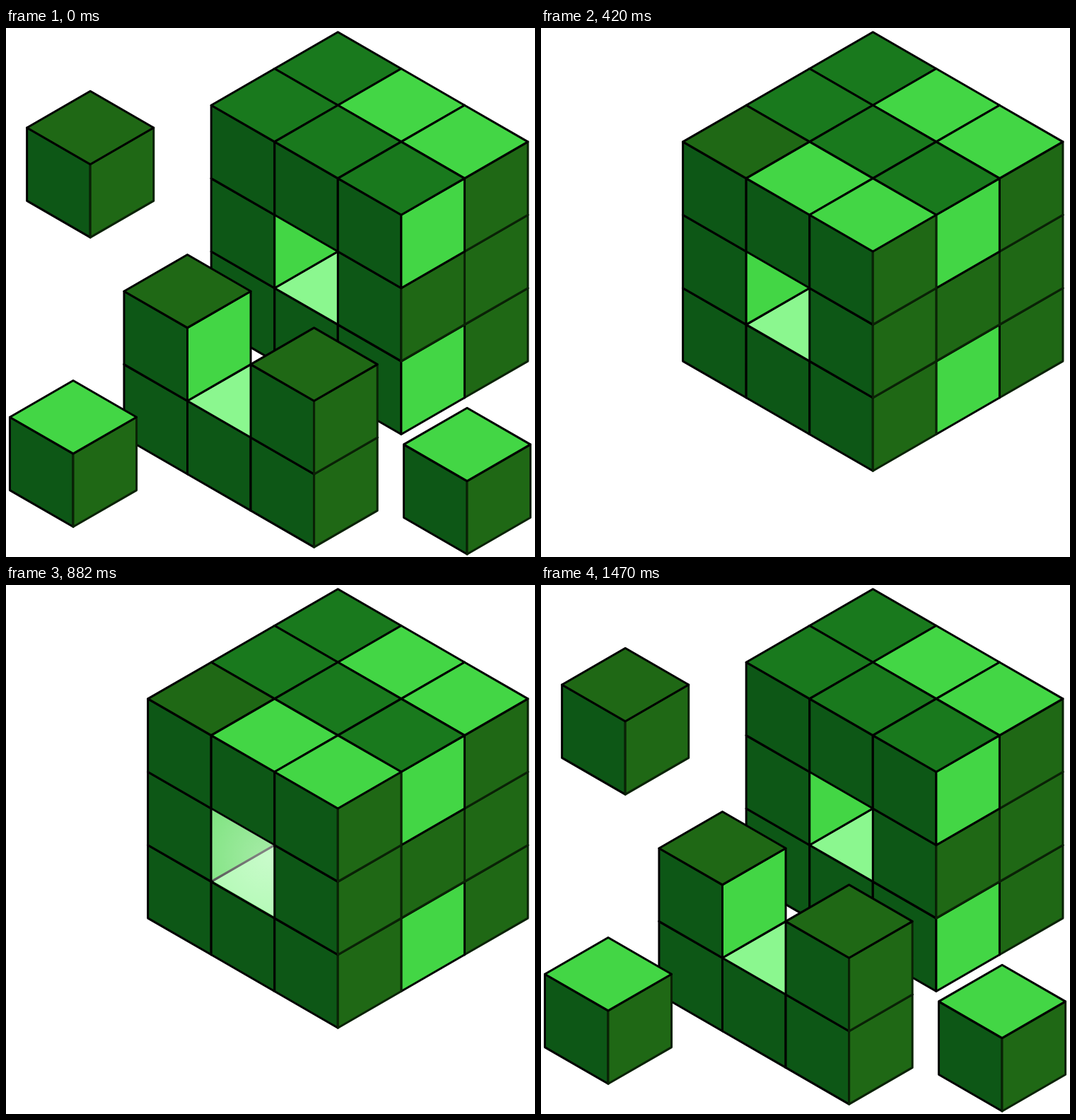
These frames come from a looping animation (748 by 748 pixels, 1.68 s). An HTML page with a canvas:

```html
<!DOCTYPE html>
<html lang="en">
<head>
<meta charset="utf-8">
<title>Cube assembly</title>
<style>
  html, body { margin: 0; width: 100%; height: 100%; overflow: hidden; background: #fff; }
  canvas { display: block; }
</style>
</head>
<body>
<canvas id="stage" width="748" height="748"></canvas>
<script>
const ctx = document.getElementById('stage').getContext('2d');
const W = 89.55, H = 51.7, Z = 2 * H;
const TOP = '#19791d', LEFT = '#0d5716', RIGHT = '#1f6815';
const BRIGHT = '#43d645', PALE = '#8bf78f', EDGE = '#0a2206';

// Isometric grid: i runs right-down, j left-down, k straight down.
const project = (i, j, k) => [469.3 + (i - j) * W, 5.8 + (i + j) * H + k * Z];

function tracePath(points) {
  ctx.beginPath();
  points.forEach(([x, y]) => ctx.lineTo(x, y));
  ctx.closePath();
}

function face(points, fill, edge = '#000') {
  tracePath(points);
  ctx.fillStyle = fill;
  ctx.strokeStyle = edge;
  ctx.fill();
  ctx.stroke();
}

// (x, y) is the rear corner of the top face.
function cube([x, y], top, right = RIGHT) {
  const l = x - W, r = x + W, mid = y + H, front = y + 2 * H;
  face([[l, mid], [x, front], [x, front + Z], [l, mid + Z]], LEFT);
  face([[x, front], [r, mid], [r, mid + Z], [x, front + Z]], right,
    right === RIGHT ? EDGE : '#000');
  face([[x, y], [r, mid], [x, front], [l, mid]], top);
}

function backBlock() {
  for (let k = 2; k >= 0; k--)
    for (let j = 0; j < 2; j++)
      for (let i = 0; i < 3; i++) {
        if (i === 1 && j === 1 && k === 1) continue;
        const top = k === 2 ? PALE : j === 0 && i > 0 ? BRIGHT : TOP;
        const lit = j === 1 && (i === 2 ? k !== 1 : i === 0 && k === 1);
        cube(project(i, j, k), top, lit ? BRIGHT : RIGHT);
      }
}

function frontBracket([x, y]) {
  const at = (i, k) => [x + i * W, y + i * H + k * Z];
  for (let i = 0; i < 3; i++) cube(at(i, 1), i === 1 ? PALE : RIGHT);
  cube(at(0, 0), RIGHT, BRIGHT);
  cube(at(2, 0), RIGHT);
}

function glow() {
  const light = ctx.createRadialGradient(372, 385, 0, 372, 385, 130);
  light.addColorStop(0, 'rgba(255,255,255,.53)');
  light.addColorStop(1, 'rgba(255,255,255,.27)');
  tracePath([[291.5, 318], [378, 368], [378, 467.5], [291.5, 417.5]]);
  ctx.fillStyle = light;
  ctx.fill();
}

// Corners of the bracket and the three loose cubes, from apart to joined.
const poses = [
  { bracket: [256.5, 320.5], loose: [[119.2, 89.3], [95, 498.5], [652, 537.2]] },
  { bracket: [276.5, 288.5], loose: [[191.2, 95.5], [234.2, 362], [583.2, 417.7]] },
  { bracket: project(0, 2, 1), loose: [0, 1, 2].map(i => project(i, 2, 0)) }
];
const STEP = 210;
const order = [0, 1, 2, 2, 2, 2, 1, 0];

function draw(time) {
  const slot = Math.floor(time / STEP) % order.length;
  const { bracket, loose } = poses[order[slot]];
  ctx.fillStyle = '#fff';
  ctx.fillRect(0, 0, 748, 748);
  backBlock();
  frontBracket(bracket);
  loose.forEach((corner, n) => cube(corner, n ? BRIGHT : RIGHT));
  if (slot === 3 || slot === 4) glow();
}

ctx.lineWidth = 3;
ctx.lineJoin = 'round';
const start = performance.now();
function tick() {
  draw(performance.now() - start);
  requestAnimationFrame(tick);
}
tick();
</script>
</body>
</html>
```
